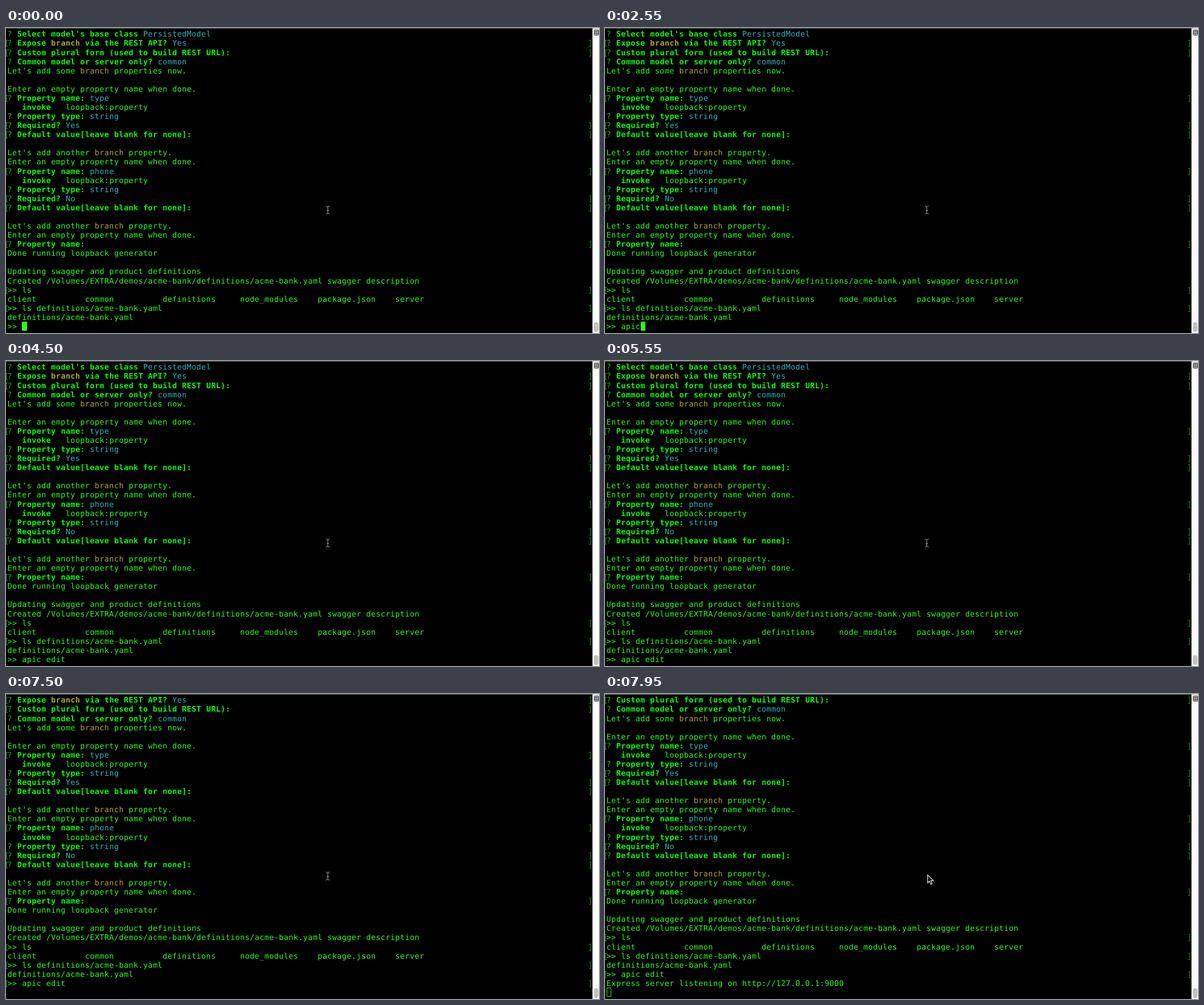
An HTML page for the animation above (8 s loop, 1043 by 537 pixels).

```html
<!DOCTYPE html>
<html lang="en">
<head>
<meta charset="utf-8">
<title>Terminal</title>
<style>
  html, body { margin: 0; width: 100%; height: 100%; overflow: hidden; background: #000; }
  #log {
    position: absolute; left: 0; top: 3.4px; width: 1031px; margin: 0;
    font: 13.5px/16.08px "DejaVu Sans Mono", monospace;
    letter-spacing: calc(8.525px - 1ch);
    text-rendering: geometricPrecision;
    color: #28fe14;
  }
  #log div { position: relative; height: 16.08px; padding-left: 2.6px; }
  #log b { color: #0f0; }
  #log i { font-style: normal; color: #2bb5c2; }
  #log u { text-decoration: none; color: #b5a522; }
  #log s { text-decoration: none; color: #1cb41c; }
  .mark::before, .mark::after {
    content: ""; position: absolute; top: 2px; width: 2px; height: 10px;
    border: 1px solid #189a18;
  }
  .mark::before { left: 0; border-right: 0; }
  .mark::after { left: 1026px; border-left: 0; }
  #cursor { position: absolute; top: 517px; height: 16px; box-sizing: border-box; border: 1px solid #28fe14; }
  svg { position: absolute; left: 0; top: 0; }
</style>
</head>
<body>
<pre id="log"></pre>
<div id="cursor"></div>
<svg width="1043" height="537">
  <path id="edge" d="M0 .5H1031"/>
  <rect x="1031.5" width="12" height="537" fill="#fafafa"/>
  <path d="M1031 .5H1043" stroke="#b5b5b5"/>
  <rect x="1034.5" y="3.5" width="8" height="9" rx="1" fill="#aaa" stroke="#333"/>
  <path d="M1036 6.5H1041M1036 9.5H1041" stroke="#333"/>
  <rect x="1034" y="518" width="8" height="17" rx="4" fill="#c1c1c1"/>
  <path id="beam" d="M562.5 313.5Q566 313.5 566 316Q566 313.5 569.5 313.5M566 316V325M562.5 327.5Q566 327.5 566 325Q566 327.5 569.5 327.5M564 321.5H568" fill="none" stroke="#a0a0a0"/>
  <path id="arrow" d="M567.5 318.5V332.5L570.7 329.5L573 335L575.5 334L573.2 328.7H577.5Z" fill="#000" stroke="#eee" stroke-width="1.2"/>
</svg>
<script>
// Markup: leading [ = bracketed row, *bold*, ~cyan~, ^yellow^
const text = `? *Select model's base class* ~PersistedModel~
[? *Expose ^branch^ via the REST API?* ~Yes~
[? *Custom plural form (used to build REST URL):*
? *Common model or server only?* ~common~
Let's add some ^branch^ properties now.

Enter an empty property name when done.
[? *Property name:* ~type~
   *invoke*   loopback:property
? *Property type:* ~string~
[? *Required?* ~Yes~
[? *Default value[leave blank for none]:*

Let's add another ^branch^ property.
Enter an empty property name when done.
[? *Property name:* ~phone~
   *invoke*   loopback:property
? *Property type:* ~string~
[? *Required?* ~No~
[? *Default value[leave blank for none]:*

Let's add another ^branch^ property.
Enter an empty property name when done.
[? *Property name:*
Done running loopback generator

Updating swagger and product definitions
Created /Volumes/EXTRA/demos/acme-bank/definitions/acme-bank.yaml swagger description
[>> ls
${["client", "common", "definitions", "node_modules", "package.json", "server"].map(n => n.padEnd(16)).join("")}
[>> ls definitions/acme-bank.yaml
definitions/acme-bank.yaml`;
const history = text.split("\n");
const command = "apic edit";
const keyTimes = [450, 750, 900, 2550, 2850, 3150, 3300, 3450, 3600];
const hidden = [[4500, 4950], [5550, 5700], [6450, 7050], [7500, 7800]];
const ENTER = 5700, READY = 7800, BLUR = 7950, LOOP = 8000;
const $ = id => document.getElementById(id);
let shown = "";

function row(line) {
  const marked = line[0] === "[";
  const html = (marked ? line.slice(1) : line)
    .replace(/^\?/, "<s>?</s>")
    .replace(/\*(.+?)\*/g, "<b>$1</b>")
    .replace(/~(.+?)~/g, "<i>$1</i>")
    .replace(/\^(.+?)\^/g, "<u>$1</u>");
  return `<div${marked ? ' class="mark"' : ""}>${html}</div>`;
}

function draw(t) {
  const typed = keyTimes.filter(k => k <= t).length;
  const lines = [...history, (t >= ENTER ? "[" : "") + ">> " + command.slice(0, typed)];
  if (t >= READY) lines.push("Express server listening on http://127.0.0.1:9000");
  if (t >= ENTER) lines.push("");
  const html = lines.slice(-33).map(row).join("");
  if (html !== shown) $("log").innerHTML = shown = html;

  const col = t < ENTER ? 3 + typed : 0;
  const edge = c => Math.round(2.85 + 8.525 * c);
  const style = $("cursor").style;
  const blurred = t >= BLUR;
  style.left = edge(col) + "px";
  style.width = edge(col + 1) - edge(col) + "px";
  style.background = blurred ? "none" : "#28fe14";
  style.visibility = hidden.some(([a, b]) => t >= a && t < b) ? "hidden" : "visible";
  $("edge").style.stroke = blurred ? "#8c8c8c" : "#6a6a6a";
  $("beam").style.display = blurred ? "none" : "";
  $("arrow").style.display = blurred ? "" : "none";
}

const start = performance.now();
function tick() {
  draw((performance.now() - start) % LOOP);
  requestAnimationFrame(tick);
}
tick();
</script>
</body>
</html>
```
